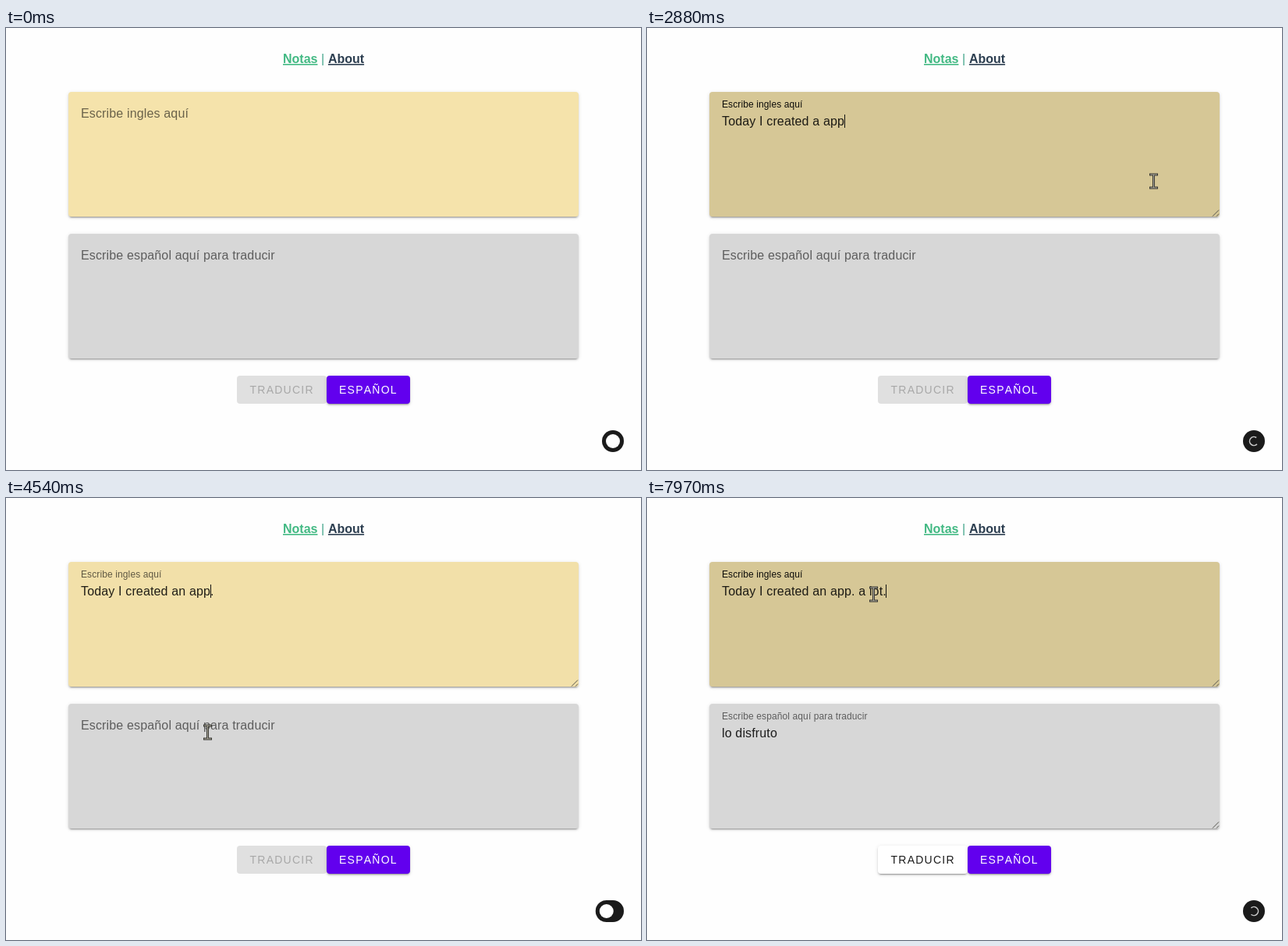
These frames come from a looping animation (814 px wide and 567 px high, 7990 ms). An HTML page:

```html
<!DOCTYPE html>
<html lang="es">
<head>
<meta charset="utf-8">
<title>Notas</title>
<style>
  html, body { margin: 0; width: 100%; height: 100%; overflow: hidden; background: #fefefe; }
  body { position: relative; font-family: "Liberation Sans", Arial, sans-serif; }
  .card { position: absolute; border-radius: 4px; --k: 1;
    box-shadow: 0 3px 1px -2px rgba(0,0,0,calc(.2 * var(--k))),
      0 2px 2px rgba(0,0,0,calc(.14 * var(--k))), 0 1px 5px rgba(0,0,0,calc(.12 * var(--k))); }
  .field { left: 80px; width: 654px; height: 160px; }
  .button { top: 446px; height: 36px; }
  svg { position: absolute; left: 0; top: 0; display: block; }
  text { white-space: pre; }
  .nav { font-size: 16px; font-weight: bold; }
  .link { text-decoration: underline; }
  .label, .input { font-size: 16px; letter-spacing: .15px; }
  .input { fill: rgba(0,0,0,.87); }
  .caption { font-size: 14px; letter-spacing: 1.25px; font-kerning: none; }
  .grip { stroke: #55554e; fill: none; }
</style>
</head>
<body>
<div class="card field" id="box0" style="top:82px"></div>
<div class="card field" id="box1" style="top:264px"></div>
<div class="card button" id="translate" style="left:296px;width:115px"></div>
<div class="card button" style="left:411px;width:107px;background:#6200ee"></div>

<svg width="814" height="567" viewBox="0 0 814 567">
  <g class="nav">
    <text class="link" x="355" y="45" fill="#42b983">Notas</text>
    <text x="403.9" y="45" fill="#42a58a" font-weight="normal">|</text>
    <text class="link" x="412.9" y="45" fill="#2c3e50">About</text>
  </g>

  <text class="label" id="label0">Escribe ingles aquí</text>
  <text class="label" id="label1">Escribe español aquí para traducir</text>
  <text class="input" id="input0" x="96" y="125"></text>
  <text class="input" id="input1" x="96" y="307"></text>
  <rect id="mistake" x="212" y="127" width="41" height="2" fill="#d8183f"/>
  <rect id="caret" width="1" height="17" fill="#111"/>
  <path class="grip" id="grip0" d="M725 241.5l8-8M730 241.5l3-3"/>
  <path class="grip" id="grip1" d="M725 423.5l8-8M730 423.5l3-3"/>

  <text class="caption" id="caption" x="312.5" y="469">TRADUCIR</text>
  <text class="caption" x="427" y="469" fill="#fff">ESPAÑOL</text>

  <rect id="badge" y="516" height="28" rx="14" fill="#1b1b1b"/>
  <circle id="dot" cy="530" r="9" fill="#fff"/>
  <text id="count" x="777" y="535" font-family="Inter, sans-serif" font-size="13" font-weight="700" fill="#fff">1</text>
  <path id="spinner" fill="none" stroke="#c8c8c8" stroke-width="1.6"/>

  <g id="beam" fill="none">
    <path d="M-5.5 -8.5H5.5M-5.5 8.5H5.5M0 -8.5V8.5" stroke="#33332e" stroke-width="3"/>
    <path d="M-4.5 -8.5H4.5M-4.5 8.5H4.5M0 -8.5V8.5" stroke="#b4b0a2" stroke-width="1"/>
  </g>
  <path id="arrow" d="M0 0V16L4 12.5L6.5 18.5L9 17.4L6.5 11.7H11.5Z" fill="#fff" stroke="#222"/>
</svg>

<script>
const LOOP = 7990, FIX = 4180, FADE = 90;
const $ = id => document.getElementById(id);
const clamp = v => Math.min(1, Math.max(0, v));
const ease = v => v * v * (3 - 2 * v);
const ramp = (t, from, span) => clamp((t - from) / span);
const show = (id, on) => $(id).setAttribute('visibility', on ? 'visible' : 'hidden');
const attr = (id, values) => {
  for (const key in values) $(id).setAttribute(key, values[key]);
};

// Each run types its text at a steady pace after the base text
const runs = [
  { field: 0, from: 0, at: 610, step: 113, base: '', text: 'Today I created a app.', rest: 100, turn: 10 },
  { field: 0, from: FIX, at: 6820, step: 145, base: 'Today I created an app.', text: ' a lot.', rest: 500, turn: 0 },
  { field: 1, from: 0, at: 5300, step: 80, base: '', text: 'lo disfruto', rest: 350, turn: 246 }
];
for (const run of runs) run.last = run.at + run.step * (run.text.length - 1);

// Focus periods; back is how far the caret stands from the end
const visits = [
  { field: 0, from: 420, to: 3920, back: 0 },
  { field: 0, from: FIX, to: 4460, back: 1 },
  { field: 1, from: 4950, to: 6370, back: 0 },
  { field: 0, from: 6370, to: LOOP, back: 0 }
];

const stops = [
  { at: 40, x: 649, y: 196 },
  { at: 3300, x: 249, y: 136 },
  { at: 3780, x: 256, y: 166 },
  { at: 4200, x: 258, y: 300 },
  { at: 4560, x: 159, y: 318 },
  { at: 6100, x: 290, y: 123 }
];

const fields = [
  { rgb: [245, 227, 171], top: 82 },
  { rgb: [215, 215, 215], top: 264 }
];

const runFor = (i, t) => runs.filter(r => r.field === i && t >= r.from).pop();
const valueOf = (run, t) =>
  run.base + run.text.slice(0, Math.max(0, Math.floor((t - run.at) / run.step) + 1));

function focusOf(i, t) {
  const levels = visits.filter(v => v.field === i)
    .map(v => ramp(t, v.from, FADE) - ramp(t, v.to, FADE));
  return Math.max(...levels);
}

function drawField(i, t) {
  const { rgb, top } = fields[i];
  const focus = focusOf(i, t);
  const up = ease(ramp(t, visits.find(v => v.field === i).from, 140));
  $('box' + i).style.background = `rgb(${rgb.map(c => Math.round(c * (1 - .125 * focus)))})`;
  attr('label' + i, {
    transform: `translate(96 ${top + 33 - 13 * up}) scale(${1 - .25 * up})`,
    fill: `rgba(0,0,0,${.57 + .37 * focus})`
  });
  $('input' + i).textContent = valueOf(runFor(i, t), t);
  show('grip' + i, up > 0);
}

function drawCaret(t) {
  const visit = visits.filter(v => t >= v.from && t < v.to + FADE).pop();
  show('caret', false);
  if (!visit) return;
  const i = visit.field, run = runFor(i, t);
  const key = t < run.at ? visit.from : t < run.last ? t : Math.max(run.last, visit.from);
  const n = valueOf(run, t).length - visit.back;
  const width = n > 0 ? $('input' + i).getSubStringLength(0, n) : 0;
  attr('caret', { x: Math.floor(96 + width), y: fields[i].top + 29 });
  show('caret', (t - key) % 1000 < 500);
}

function drawButton(t) {
  const ready = t >= runs[2].at;
  $('translate').style.background = ready ? '#fff' : '#e0e0e0';
  $('translate').style.setProperty('--k', ramp(t, runs[2].at, 280));
  attr('caption', { fill: ready ? '#1c1c1c' : 'rgba(0,0,0,.25)' });
}

function drawBadge(t) {
  const w = 28 + 15 * (ramp(t, 3080, 120) - ramp(t, 4460, 180));
  const busy = runs.find(r => t >= r.at && t < r.last + r.rest);
  attr('badge', { x: 792 - w, width: w });
  attr('dot', { cx: 806 - w });
  show('dot', !busy);
  show('count', w === 43);
  show('spinner', busy);
  if (busy) drawSpinner(t - busy.at, busy.turn);
}

function drawSpinner(age, turn) {
  const gap = (25 + 25 * ramp(age, 50, 250)) * Math.PI / 180;
  const x = 5.5 * Math.cos(gap), y = 5.5 * Math.sin(gap);
  attr('spinner', {
    d: `M${x} ${y}A5.5 5.5 0 1 1 ${x} ${-y}`,
    transform: `translate(778 530) rotate(${turn + age / 768 * 360})`
  });
}

function drawMouse(t) {
  let x = 668, y = 575;
  for (const stop of stops) {
    const k = ease(ramp(t, stop.at, 340));
    x += (stop.x - x) * k;
    y += (stop.y - y) * k;
  }
  const overText = x > 80 && x < 734 && fields.some(f => y >= f.top && y < f.top + 160);
  const transform = `translate(${Math.round(x) + .5} ${Math.round(y) + .5})`;
  show('beam', overText);
  show('arrow', !overText);
  attr('beam', { transform });
  attr('arrow', { transform });
}

function draw(t) {
  fields.forEach((_, i) => drawField(i, t));
  show('mistake', t >= 3150 && t < FIX);
  drawCaret(t);
  drawButton(t);
  drawBadge(t);
  drawMouse(t);
}

const start = performance.now();
function tick() {
  draw((performance.now() - start) % LOOP);
  requestAnimationFrame(tick);
}
tick();
</script>
</body>
</html>
```
